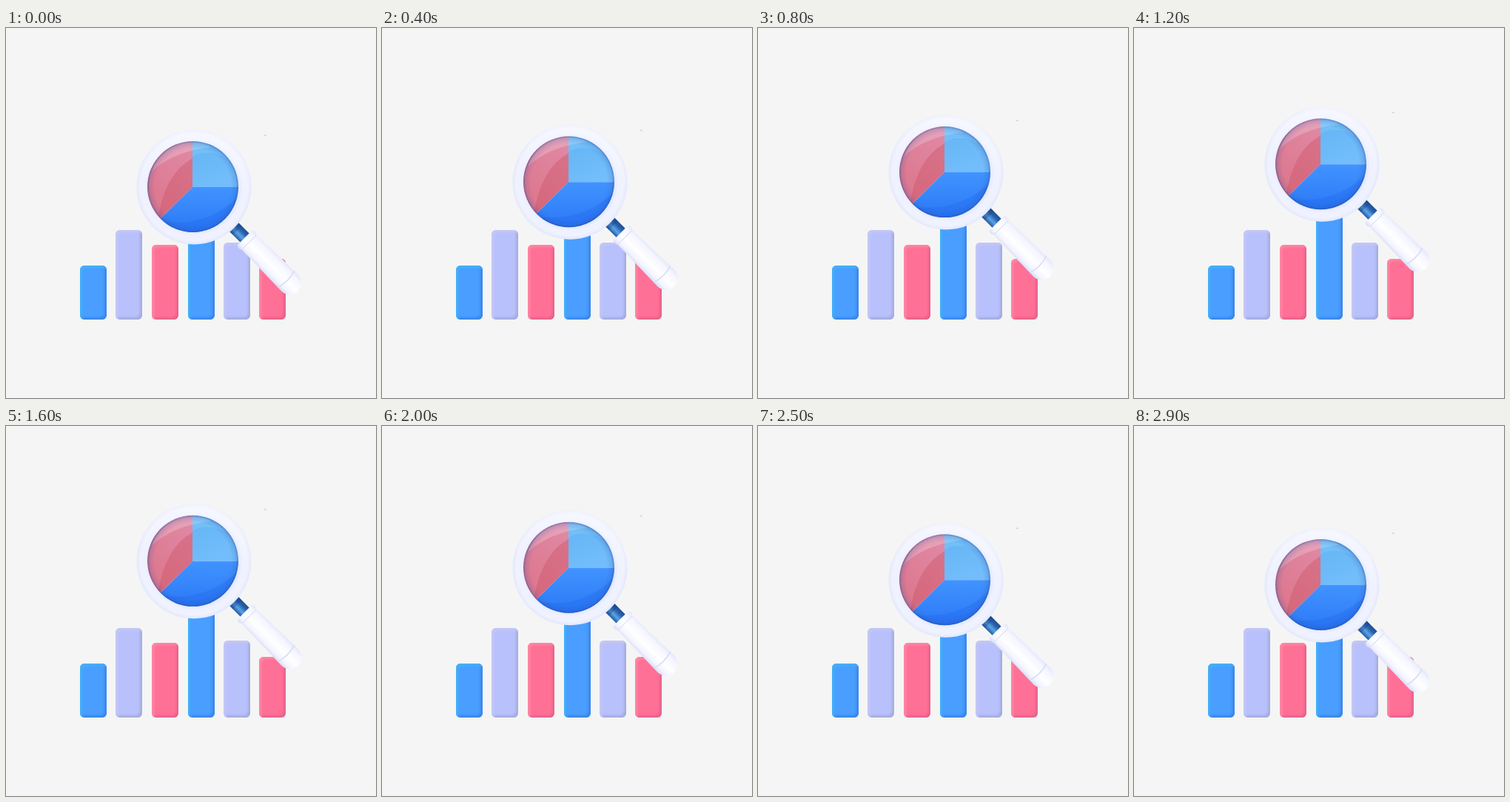
These frames come from a looping animation (500 by 500 pixels, 3000 ms). An HTML page:

```html
<!DOCTYPE html>
<html lang="en">
<head>
<meta charset="utf-8">
<title>Chart and magnifier</title>
<style>
  html, body { margin: 0; width: 100%; height: 100%; overflow: hidden; background: #f5f5f5; }
  .stage { position: relative; width: 500px; height: 500px; overflow: hidden; }
  .bar {
    position: absolute; left: var(--x); top: var(--y); bottom: 106.5px;
    width: 36px; border-radius: 6px; background: var(--fill);
    box-shadow: inset 3px 3px 3px var(--light), inset -3px -3px 3px var(--dark);
  }
  .blue { --fill: #4a9eff; --light: #43b0f6; --dark: #3b87ea; }
  .lilac { --fill: #b9c1fd; --light: #c3c7f3; --dark: #a5addf; }
  .pink { --fill: #ff7096; --light: #fc87a3; --dark: #e9638a; }
  svg { position: absolute; inset: 0; }
</style>
</head>
<body>
<div class="stage">
  <div class="bar blue" style="--x: 99.5px; --y: 321px"></div>
  <div class="bar lilac" style="--x: 148px; --y: 272.5px"></div>
  <div class="bar pink" style="--x: 196.5px; --y: 293px"></div>
  <div class="bar blue" style="--x: 245.5px; --y: 225px"></div>
  <div class="bar lilac" style="--x: 294px; --y: 290px"></div>
  <div class="bar pink" style="--x: 342px; --y: 312px"></div>

  <svg width="500" height="500" viewBox="0 0 500 500">
    <defs>
      <clipPath id="lens"><circle cx="252.5" cy="214.5" r="61.5"/></clipPath>
      <radialGradient id="rim">
        <stop offset=".78" stop-color="#e2e7fd"/>
        <stop offset=".84" stop-color="#eef1ff"/>
        <stop offset=".93" stop-color="#f0f2ff"/>
        <stop offset="1" stop-color="#e3e8fb"/>
      </radialGradient>
      <linearGradient id="rimLight" x1=".55" y1="0" x2=".4" y2="1">
        <stop offset="0" stop-color="#fff" stop-opacity=".45"/>
        <stop offset=".5" stop-color="#fff" stop-opacity="0"/>
      </linearGradient>
      <linearGradient id="rose" x1=".7" y1="0" x2=".2" y2="1">
        <stop offset="0" stop-color="#e088a4"/>
        <stop offset="1" stop-color="#dc7185"/>
      </linearGradient>
      <linearGradient id="sky" x1="0" y1="0" x2=".4" y2="1">
        <stop offset="0" stop-color="#62b4f3"/>
        <stop offset="1" stop-color="#73bdfb"/>
      </linearGradient>
      <linearGradient id="deep" x1="0" y1="0" x2="0" y2="1">
        <stop offset="0" stop-color="#4193ff"/>
        <stop offset="1" stop-color="#2a76f5"/>
      </linearGradient>
      <radialGradient id="edge">
        <stop offset=".84" stop-color="#2b4fa8" stop-opacity="0"/>
        <stop offset=".95" stop-color="#2b4fa8" stop-opacity=".16"/>
        <stop offset="1" stop-color="#2b4490" stop-opacity=".5"/>
      </radialGradient>
      <linearGradient id="rod" x1="0" y1="0" x2="0" y2="1">
        <stop offset="0" stop-color="#1f4f92"/>
        <stop offset=".3" stop-color="#2a61ab"/>
        <stop offset=".65" stop-color="#5ba3e6"/>
        <stop offset="1" stop-color="#245a9f"/>
      </linearGradient>
      <linearGradient id="grip" x1="0" y1="0" x2="0" y2="1">
        <stop offset="0" stop-color="#e3e7fb"/>
        <stop offset=".2" stop-color="#f5f6ff"/>
        <stop offset=".55" stop-color="#fff"/>
        <stop offset=".82" stop-color="#f3f4ff"/>
        <stop offset="1" stop-color="#d9ddf6"/>
      </linearGradient>
    </defs>

    <g id="glass">
      <circle cx="350.3" cy="145" r="1" fill="#bfc3d6"/>

      <g transform="translate(254 215) rotate(45)">
        <rect x="70" y="-8.5" width="32" height="17" fill="url(#rod)"/>
        <rect x="76" y="-8.5" width="7" height="17" fill="#173f86" opacity=".35"/>
        <path d="M103-14 L183-16 A16 16 0 0 1 183 16 L103 14Z" fill="url(#grip)"/>
        <path d="M176-15.8 Q181 0 176 15.8" fill="none" stroke="#d7dcf6" stroke-width="1.6"/>
        <rect x="97" y="-15.5" width="8" height="31" rx="3.5" fill="url(#grip)"/>
        <path d="M105.5-13.5V13.5" stroke="#dde1f8" stroke-width="1.2"/>
      </g>

      <circle cx="254" cy="215" r="77.5" fill="url(#rim)"/>
      <circle cx="254" cy="215" r="77.5" fill="url(#rimLight)"/>

      <g clip-path="url(#lens)">
        <path d="M252 215V150H185V281Z" fill="url(#rose)"/>
        <path d="M252 150H318V215H252Z" fill="url(#sky)"/>
        <path d="M252 215H318V281H185Z" fill="url(#deep)"/>
        <path d="M252 176 Q214 197 205 260 L252 215Z" fill="#c8505f" opacity=".38"/>
        <path d="M216 262 Q275 268 316 226 V281 H205Z" fill="#1d63ec" opacity=".3"/>
        <path d="M197 194 Q211 156 252 153 Q269 153 277 161 Q225 167 197 194Z" fill="#fff" opacity=".2"/>
        <path d="M252 174 Q276 160 308 182 L300 165 Q276 148 252 152Z" fill="#9fdcff" opacity=".22"/>
        <circle cx="252.5" cy="214.5" r="61.5" fill="url(#edge)"/>
      </g>
    </g>
  </svg>
</div>
<script>
  const LOOP = 3000, STEP = 100, RISE = 33;
  const glass = document.getElementById('glass');

  // The glass bobs on a cosine, held for one step at a time.
  function draw() {
    const t = performance.now() % LOOP;
    const mid = (Math.floor(t / STEP) + 0.5) * STEP;
    const lift = RISE * (1 - Math.cos(2 * Math.PI * mid / LOOP)) / 2;
    glass.setAttribute('transform', `translate(0 ${-lift.toFixed(2)})`);
    requestAnimationFrame(draw);
  }
  draw();
</script>
</body>
</html>
```
